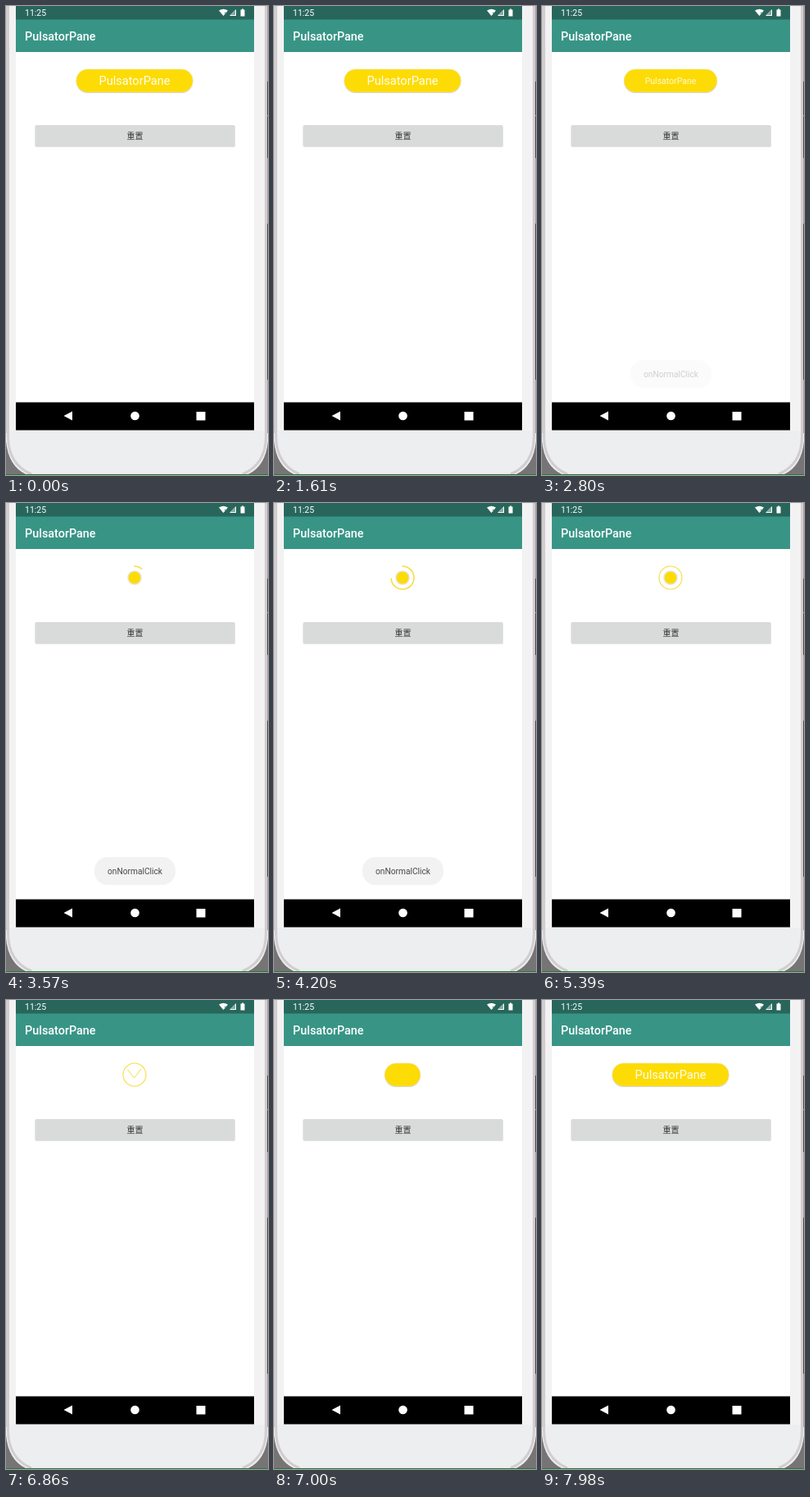
Recreate the animation shown at these times as an HTML page. Size 320 by 571 pixels, loop 8 s.

```html
<!DOCTYPE html>
<html lang="en">
<head>
<meta charset="utf-8">
<style>
  html, body { margin: 0; width: 100%; height: 100%; overflow: hidden; background: #eceeef; }
  svg { display: block; width: 320px; height: 571px; }
  text { font-family: Roboto, "Noto Sans CJK SC", "Noto Sans CJK", sans-serif; }
  .mid { text-anchor: middle; }
  .line { fill: none; stroke: #f8dc3c; stroke-linecap: round; stroke-linejoin: round; }
</style>
</head>
<body>
<svg viewBox="0 0 320 571">
  <!-- device body -->
  <rect width="320" height="571" fill="#eceeef"/>
  <path d="M0 0H12V517H0ZM303 0H316V517H303Z" fill="#f3f2f3"/>
  <path d="M2.5 0V525Q3 558 31 570M317.5 0V525Q317 558 289 570" fill="none" stroke="#d3cdd0" stroke-width="3"/>
  <path d="M0 530Q3 560 24 570H0ZM320 530Q317 560 296 570H320Z" fill="#777476"/>
  <path d="M0 0V520" stroke="#aaa5a8"/>
  <path d="M319.5 0V520" stroke="#aaa5a8"/>
  <path d="M319.5 92V133M319.5 134V185M319.5 265V455" stroke="#4c494b"/>
  <rect y="570" width="320" height="1" fill="#267a31"/>

  <!-- screen -->
  <rect x="12" width="291" height="517" fill="#fff"/>
  <rect x="12" width="291" height="17" fill="#28665c"/>
  <rect x="12" y="16.5" width="291" height="39.5" fill="#389586"/>
  <text x="23" y="12" font-size="10.5" fill="#fff">11:25</text>
  <path d="M260 5.5Q265.500 2 271 5.500L265.500 12ZM281 4V12H273ZM286.500 4.500H288V3.500H290V4.500H291.500V12.500H286.500Z" fill="#fff"/>
  <path d="M267 8L271 12M271 8L267 12" stroke="#28665c"/>
  <path d="M280 5V11H274Z" fill="#85aaa3"/>
  <text x="23" y="42" font-size="14.4" font-weight="500" fill="#fff">PulsatorPane</text>
  <rect x="35.500" y="146" width="244.500" height="26" rx="2" fill="#c9cbcb" opacity=".5"/>
  <rect x="35.500" y="145" width="244" height="26" rx="1.500" fill="#d9dbdb"/>
  <text class="mid" x="157.500" y="162" font-size="10" font-weight="500" fill="#333">重置</text>
  <rect x="12" y="482.500" width="291" height="34" fill="#000"/>
  <path d="M81 493.500V504.500L70.500 499ZM232.500 494H243.500V504.500H232.500Z" fill="#fff"/>
  <circle cx="157.500" cy="499" r="5.300" fill="#fff"/>

  <!-- animated control -->
  <g id="pill">
    <rect class="body" y="78" height="28" rx="14" fill="#cfcfcf"/>
    <rect class="body" y="77" height="28" rx="14" fill="#fddb05" stroke="#eee3a0" stroke-width=".6"/>
    <text id="label" class="mid" x="157" fill="#fffdf0">PulsatorPane</text>
  </g>
  <circle id="disc" cx="157" cy="91" fill="#fddb05" stroke="#e6e2cc" stroke-width="1.500"/>
  <circle id="ring" class="line" cx="157" cy="91" r="14" pathLength="100" transform="rotate(-90 157 91)" stroke-width="1.300"/>
  <path id="check" class="line" d="M149 85L156.500 95L165 84" pathLength="100" stroke-width="1"/>

  <g id="toast">
    <rect x="108" y="431" width="99" height="34" rx="16" fill="#f2f2f2"/>
    <text class="mid" x="157.500" y="452" font-size="10.200" fill="#484848">onNormalClick</text>
  </g>
</svg>
<script>
const $ = id => document.getElementById(id);
const pill = $("pill"), label = $("label"), disc = $("disc");
const ring = $("ring"), check = $("check"), toast = $("toast");
const bodies = document.querySelectorAll(".body");

const ramp = (t, from, to) => Math.min(1, Math.max(0, (t - from) / (to - from)));
const smooth = x => (1 - Math.cos(Math.PI * x)) / 2;
const mix = (a, b, x) => a + (b - a) * x;

function trace(el, amount, opacity) {
  el.setAttribute("stroke-dasharray", `${amount * 100} 200`);
  el.setAttribute("opacity", amount > 0 ? opacity : 0);
}

function draw(t) {
  const resetting = t >= 6900;
  const collapse = resetting
    ? 1 - smooth(ramp(t, 6900, 7320))
    : smooth(ramp(t, 2660, 3080));
  const width = mix(142.5, 28, collapse);
  for (const body of bodies) {
    body.setAttribute("x", 157 - width / 2);
    body.setAttribute("width", width);
  }
  const size = 14.6 * (1 - collapse * 1.1);
  label.setAttribute("font-size", Math.max(0, size));
  label.setAttribute("y", 91 + Math.max(0, size) * .35);
  label.setAttribute("opacity", size > .5 ? 1 - collapse * .5 : 0);
  pill.setAttribute("opacity", t < 3080 || resetting ? 1 : 0);

  const shrink = smooth(ramp(t, 3080, 3430));
  const vanish = smooth(ramp(t, 5410, 5610));
  disc.setAttribute("r", mix(14, 8, shrink) * (1 - vanish));
  disc.setAttribute("opacity", t >= 3080 && t < 5610 ? 1 : 0);

  const fade = 1 - ramp(t, 6880, 6960);
  const sweep = 1 - (1 - ramp(t, 3500, 5450)) ** 3;
  trace(ring, sweep, fade);
  ring.setAttribute("stroke-width", mix(1.5, 1.1, ramp(t, 4200, 5390)));
  trace(check, smooth(ramp(t, 5560, 5860)), fade);

  toast.setAttribute("opacity", ramp(t, 2720, 3040) * (1 - ramp(t, 4760, 5060)));
}

function tick(now) {
  draw(now % 8000);
  requestAnimationFrame(tick);
}
draw(0);
requestAnimationFrame(tick);
</script>
</body>
</html>
```
